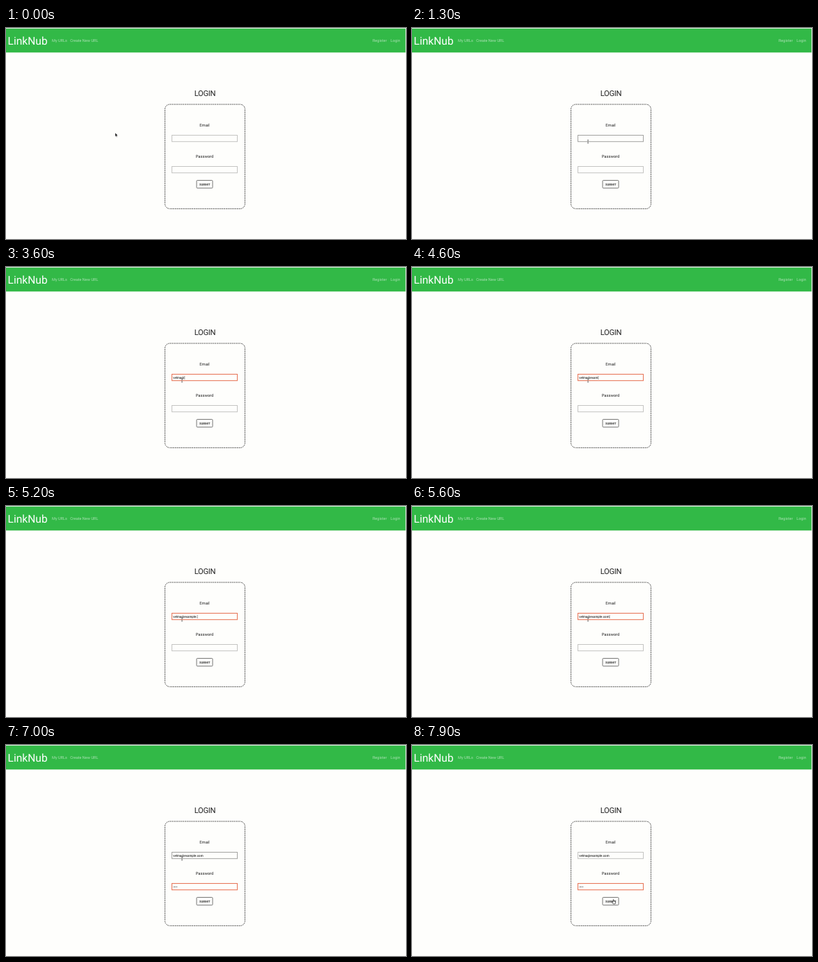
Animation of 575 by 304 pixels, one loop 8000 ms. Source, as an HTML page:

```html
<!DOCTYPE html>
<html lang="en">
<head>
<meta charset="utf-8">
<title>Login</title>
<style>
  html, body { margin: 0; width: 100%; height: 100%; overflow: hidden; background: #fefefc; }
  svg { display: block; width: 575px; height: 304px; }
  text { font-family: Roboto, sans-serif; fill: #222; text-rendering: geometricPrecision; }
  .brand { font-size: 15.6px; fill: #fff; }
  .nav text { font-size: 5.6px; fill: #a9e0b2; }
  .heading { font-size: 11.2px; letter-spacing: -.3px; }
  .label { font-size: 5.8px; }
  .value { font-size: 4.5px; font-weight: 500; }
  .submit { font-size: 4.3px; font-weight: 500; }
  .mid { text-anchor: middle; }
  .field { fill: none; stroke: #c4c4c2; stroke-width: 1; }
  .field.hover { stroke: #a2a2a0; }
  .field.focus { stroke: #e8785c; stroke-width: 1.1; }
  .caret { stroke: #444; stroke-width: .5; }
</style>
</head>
<body>
<svg viewBox="0 0 575 304">
  <rect width="575" height="304" fill="#fefefc"/>
  <rect y=".8" width="574.3" height="34.5" fill="#32b947"/>
  <text class="brand" x="2.5" y="23.5">LinkNub</text>
  <g class="nav">
    <text x="66" y="19.9">My URLs</text>
    <text x="92.2" y="19.9">Create New URL</text>
    <text x="526.9" y="19.9">Register</text>
    <text x="552.8" y="19.9">Login</text>
  </g>
  <text class="heading mid" x="286" y="98">LOGIN</text>
  <rect x="228.5" y="110" width="115" height="150.4" rx="7" fill="none" stroke="#333" stroke-width=".9" stroke-dasharray="1.7 1"/>
  <text class="label mid" x="285.5" y="142">Email</text>
  <rect id="email" class="field" x="238.5" y="154.5" width="94" height="9.2"/>
  <text id="emailText" class="value" x="240.2" y="161"></text>
  <text class="label mid" x="285.5" y="187">Password</text>
  <rect id="password" class="field" x="238.5" y="199.5" width="94" height="9.2"/>
  <text id="passwordText" class="value" x="240.2" y="206"></text>
  <path id="caret" class="caret"/>
  <rect x="274" y="219.5" width="23" height="11.2" rx="1.2" fill="none" stroke="#555" stroke-width=".8"/>
  <text class="submit mid" x="285.7" y="226.7">SUBMIT</text>
  <g id="cursor">
    <path id="arrow" d="M0 0V5.4L1.2 4.3L2 6.2L2.9 5.8L2.1 4H3.7Z" fill="#111" stroke="#fff" stroke-width=".35"/>
    <path id="beam" d="M-1 -2.4Q0 -2.4 0 -1.7Q0 -2.4 1 -2.4M0 -1.7V1.9M-1 2.6Q0 2.6 0 1.9Q0 2.6 1 2.6" fill="none" stroke="#444" stroke-width=".6"/>
    <path id="hand" d="M-.6 -.3Q0 -1 .5 -.3V1.7L2.9 2.2Q3.3 2.5 3.1 3.6L2.5 5.6H-.6L-2.4 2.9Q-2.2 2 -1.4 2.6L-.6 3.3Z" fill="#fff" stroke="#111" stroke-width=".65"/>
  </g>
</svg>
<script>
const LOOP = 8000, TICK = 100;
const FOCUS_EMAIL = 1500, FOCUS_PASSWORD = 5800, CARET_OFF = 7000;
const EMAIL = "velma@example.com";
const emailKeys = [2400, 2500, 2700, 2800, 2900, 3600, 3900, 4200, 4400,
                   4600, 4700, 4800, 4900, 5100, 5400, 5500, 5600];
const passwordKeys = [6200, 6300, 6500, 6700];
const moves = [
  { start: 800, steps: 6, from: [157, 151], to: [253, 163.6] },
  { start: 7300, steps: 7, from: [253, 163.6], to: [289.6, 223.3] }
];

const el = id => document.getElementById(id);
const typed = (keys, t) => keys.filter(k => k <= t).length;
const inside = ([x, y], x0, y0, x1, y1) => x >= x0 && x <= x1 && y >= y0 && y <= y1;

function pointerAt(t) {
  const { start, steps, from, to } = t < moves[1].start ? moves[0] : moves[1];
  const step = Math.floor((t - start) / TICK) + 1;
  const p = Math.min(Math.max(step / steps, 0), 1);
  const eased = p * p * (3 - 2 * p);
  return from.map((v, i) => v + (to[i] - v) * eased);
}

function drawField(id, focused, hovered) {
  el(id).setAttribute("class", "field" + (focused ? " focus" : hovered ? " hover" : ""));
}

function render(t) {
  el("emailText").textContent = EMAIL.slice(0, typed(emailKeys, t));
  el("passwordText").textContent = "•".repeat(typed(passwordKeys, t));

  const pos = pointerAt(t);
  const overEmail = inside(pos, 238, 154, 333, 165);
  const overPassword = inside(pos, 238, 199, 333, 210);
  const overSubmit = inside(pos, 274, 219, 297, 231);
  const onPassword = t >= FOCUS_PASSWORD;
  const onEmail = t >= FOCUS_EMAIL && !onPassword;
  drawField("email", onEmail, overEmail);
  drawField("password", onPassword, overPassword);

  const text = el(onPassword ? "passwordText" : "emailText");
  const x = 240.6 + (text.textContent ? text.getComputedTextLength() : 0);
  const y = onPassword ? 202 : 157;
  el("caret").setAttribute("d", `M${x} ${y}v5`);
  el("caret").style.display = t >= FOCUS_EMAIL && t < CARET_OFF ? "" : "none";

  const shape = overSubmit ? "hand" : overEmail || overPassword ? "beam" : "arrow";
  for (const id of ["arrow", "beam", "hand"]) el(id).style.display = id === shape ? "" : "none";
  el("cursor").setAttribute("transform", `translate(${pos})`);
}

function frame() {
  render(performance.now() % LOOP);
  requestAnimationFrame(frame);
}
frame();
</script>
</body>
</html>
```
